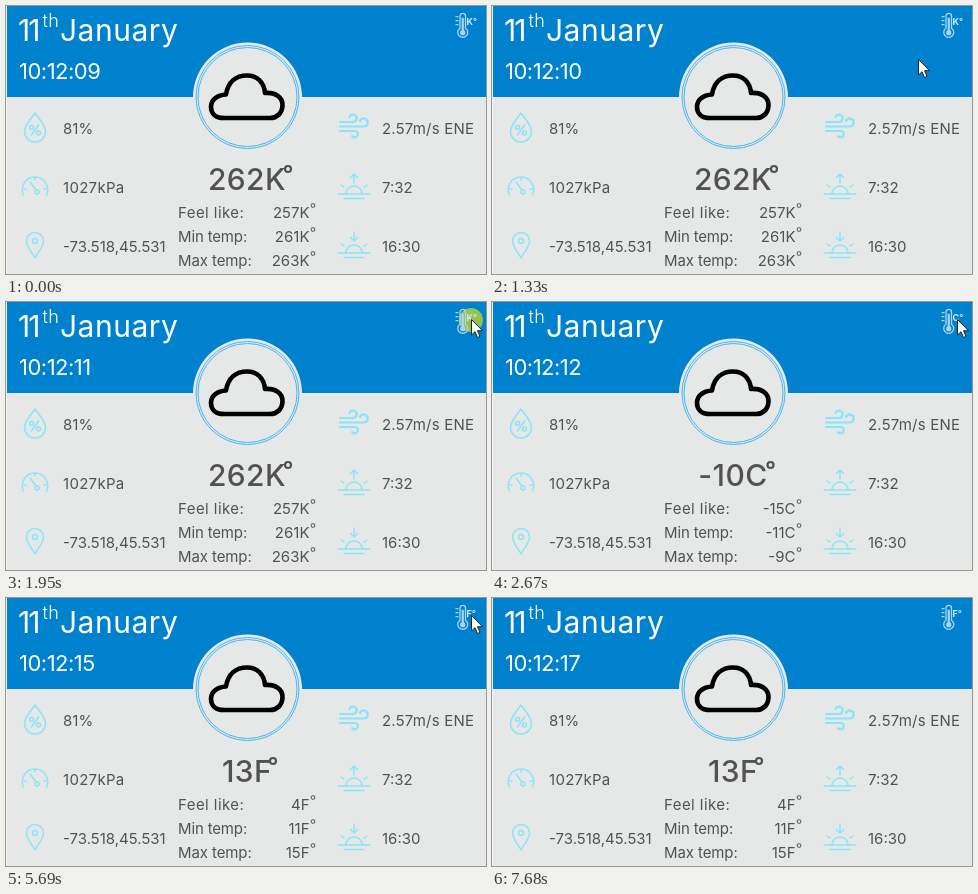
These frames come from a looping animation (480 by 268 pixels, 8 s). An HTML page:

```html
<!DOCTYPE html>
<html lang="en">
<head>
<meta charset="utf-8">
<title>Weather panel</title>
<style>
  html, body { margin: 0; width: 100%; height: 100%; overflow: hidden; background: #e6e8e8; }
  svg { display: block; width: 480px; height: 268px; }
  text { font-family: Inter, "Open Sans", sans-serif; fill: #525252; font-size: 15px; white-space: pre; }
  .head text { fill: #fff; }
  .date { font-size: 30px; }
  .sup { font-size: 18px; font-weight: 300; }
  .clock { font-size: 22px; letter-spacing: -.5px; }
  .main { font-size: 30px; font-weight: 450; letter-spacing: .4px; text-anchor: middle; }
  .right { text-anchor: end; }
  .icon { fill: none; stroke: #8ae6f7; stroke-width: 1.5; stroke-linecap: round; stroke-linejoin: round; }
  .ring { fill: none; stroke: #45b6f3; }
  .deg { fill: none; stroke: #525252; }
  .thermo { fill: none; stroke: #a9d6f2; stroke-width: 1.3; stroke-linecap: round; }
  .head .unit { font-size: 9px; font-weight: 700; fill: #d3eafa; }
</style>
</head>
<body>
<svg viewBox="0 0 480 268">
  <defs>
    <path id="sun" d="M-16 8H16M-8 8A8 8 0 0 1 8 8M-13 -1L-10 1M13 -1L10 1M-10 12.5H10"/>
    <rect id="small" x="-1.7" y="-1.7" width="3.4" height="3.4" rx=".8"/>
  </defs>
  <rect width="480" height="268" fill="#e6e8e8"/>
  <g class="head">
    <rect width="480" height="91" fill="#0081ce"/>
    <rect width="1" height="268" fill="#f4f6f6"/>
    <text class="date" x="12" y="35" letter-spacing="-2">11</text>
    <text class="sup" x="36.5" y="20.5" letter-spacing=".3">th</text>
    <text class="date" x="54" y="35" letter-spacing=".5">January</text>
    <text class="clock" id="clock" x="13" y="73"></text>
  </g>

  <circle cx="241.5" cy="91" r="54.5" fill="#e6e8e8"/>
  <circle class="ring" cx="241.5" cy="91" r="51.5"/>
  <circle class="ring" cx="241.5" cy="91" r="49.5"/>
  <path fill="none" stroke="#000" stroke-width="4.6" stroke-linejoin="round"
    d="M218 112C209 112 205 107 205 101C205 94 211 89 220 88.5C222 76 230 69.5 241 69.5C251 69.5 258 76 259 87C269 86 276.5 91 276.5 99C276.5 107 271 112 264 112Z"/>

  <g class="icon">
    <path d="M29 107C25 113 18.5 119 18.5 125.5A10.5 10.5 0 0 0 39.5 125.5C39.5 119 33 113 29 107Z"/>
    <path d="M32.5 119L25.5 129"/>
    <circle cx="25.5" cy="121.5" r="2"/><circle cx="32.5" cy="127" r="2"/>
    <path d="M17.5 189A12.7 12.7 0 1 1 40.5 189M30 184L24 176M18 183H20M40 183H38M29 172V174"/>
    <circle cx="31" cy="186" r="2"/>
    <path d="M29 252C26 246 20.5 241 20.5 235A8.5 8.5 0 0 1 37.5 235C37.5 241 32 246 29 252Z"/>
    <circle cx="29" cy="235" r="2.4"/>
    <path stroke-width="2.2" d="M334 116H347A3.7 3.7 0 1 0 343.5 111M334 120.5H358A4 4 0 1 0 354 115M334 125H349A3.2 3.2 0 1 1 346 130"/>
    <use href="#sun" x="348" y="180"/>
    <path d="M348 177V168M344.5 171.5L348 168L351.5 171.5"/>
    <use href="#sun" x="348" y="239"/>
    <path d="M348 226V235M344.5 231.5L348 235L351.5 231.5"/>
  </g>

  <text x="57" y="128">81%</text>
  <text x="57" y="187" letter-spacing=".3">1027kPa</text>
  <text x="57" y="246">-73.518,45.531</text>
  <text x="376" y="128" letter-spacing=".2">2.57m/s ENE</text>
  <text x="376" y="187">7:32</text>
  <text x="376" y="246">16:30</text>

  <text class="main" id="temp" x="241" y="184"></text>
  <circle class="deg" id="tempDeg" cy="163" r="3" stroke-width="2.2"/>
  <text x="172" y="212" letter-spacing=".45">Feel like:</text>
  <text x="172" y="236" letter-spacing="-.15">Min temp:</text>
  <text x="172" y="260" letter-spacing="-.1">Max temp:</text>
  <g id="values">
    <text class="right" x="303.5" y="212"></text>
    <text class="right" x="303.5" y="236"></text>
    <text class="right" x="303.5" y="260"></text>
  </g>
  <g class="deg">
    <use href="#small" x="307" y="199.5"/>
    <use href="#small" x="307" y="223.5"/>
    <use href="#small" x="307" y="247.5"/>
  </g>

  <circle id="press" cx="465" cy="18" r="12" fill="#b4d234" fill-opacity=".82"/>
  <g class="head">
    <g class="thermo" transform="translate(.5 .7)">
      <path d="M453.5 21.5V9.5A2.7 2.7 0 0 1 459 9.5V21.5A5 5 0 1 1 453.5 21.5ZM449.5 10H451.5M449.5 14H451.5M449.5 18H451.5"/>
      <path stroke-width="2.2" d="M456.25 12V25"/>
      <circle cx="456.25" cy="26" r="2" fill="#a9d6f2"/>
    </g>
    <text class="unit" id="unit" x="460.5" y="19"></text>
  </g>
  <path id="cursor" fill="#fff" stroke="#222" stroke-width="1" d="M.5 .5V16L4 12.7L6.5 18.5L9 17.4L6.5 11.7H11.5Z"/>
</svg>
<script>
  const LOOP = 8000, STEP = 50;
  const ticks = [660, 1690, 2670, 3640, 4670, 5690, 6680, 7680];
  const units = [
    { from: 0, unit: "K", temp: "262", deg: 282, rows: [257, 261, 263] },
    { from: 2000, unit: "C", temp: "-10", deg: 278.5, rows: [-15, -11, -9] },
    { from: 4150, unit: "F", temp: "13", deg: 267, rows: [4, 11, 15] }
  ];
  // Pointer keys: time, x, y
  const enter = [[920, 364, 124], [1070, 386, 106], [1320, 426, 53], [1520, 450, 22],
                 [1620, 456, 14], [1690, 459, 14], [1790, 465, 17]];
  const leave = [[6350, 465, 17], [6450, 467, 34], [6600, 471, 110], [6750, 475, 242]];

  const el = id => document.getElementById(id);
  const rows = el("values").children;

  function pointAt(keys, time) {
    const start = keys[0][0];
    const t = start + Math.floor((time - start) / STEP) * STEP;
    const i = keys.findIndex(k => k[0] > t);
    if (i < 0) return keys[keys.length - 1].slice(1);
    const a = keys[i - 1], b = keys[i];
    const p = (t - a[0]) / (b[0] - a[0]);
    return [1, 2].map(n => a[n] + (b[n] - a[n]) * p);
  }

  function setText(node, text) {
    if (node.textContent !== text) node.textContent = text;
  }

  function draw(t) {
    const seconds = 9 + ticks.filter(x => x <= t).length;
    setText(el("clock"), "10:12:" + String(seconds).padStart(2, "0"));

    const u = units.filter(x => x.from <= t).pop();
    setText(el("temp"), u.temp + u.unit);
    setText(el("unit"), u.unit + "°");
    el("tempDeg").setAttribute("cx", u.deg);
    u.rows.forEach((v, i) => setText(rows[i], v + u.unit));

    const pressed = units.some(x => x.from && t >= x.from - 150 && t < x.from);
    el("press").style.display = pressed ? "" : "none";

    const shown = t >= 920 && t < 6800;
    el("cursor").style.display = shown ? "" : "none";
    if (shown) {
      const [x, y] = pointAt(t < 6350 ? enter : leave, t);
      el("cursor").setAttribute("transform", `translate(${Math.round(x)} ${Math.round(y)})`);
    }
  }

  const begin = performance.now();
  function frame() {
    draw((performance.now() - begin) % LOOP);
    requestAnimationFrame(frame);
  }
  frame();
</script>
</body>
</html>
```
